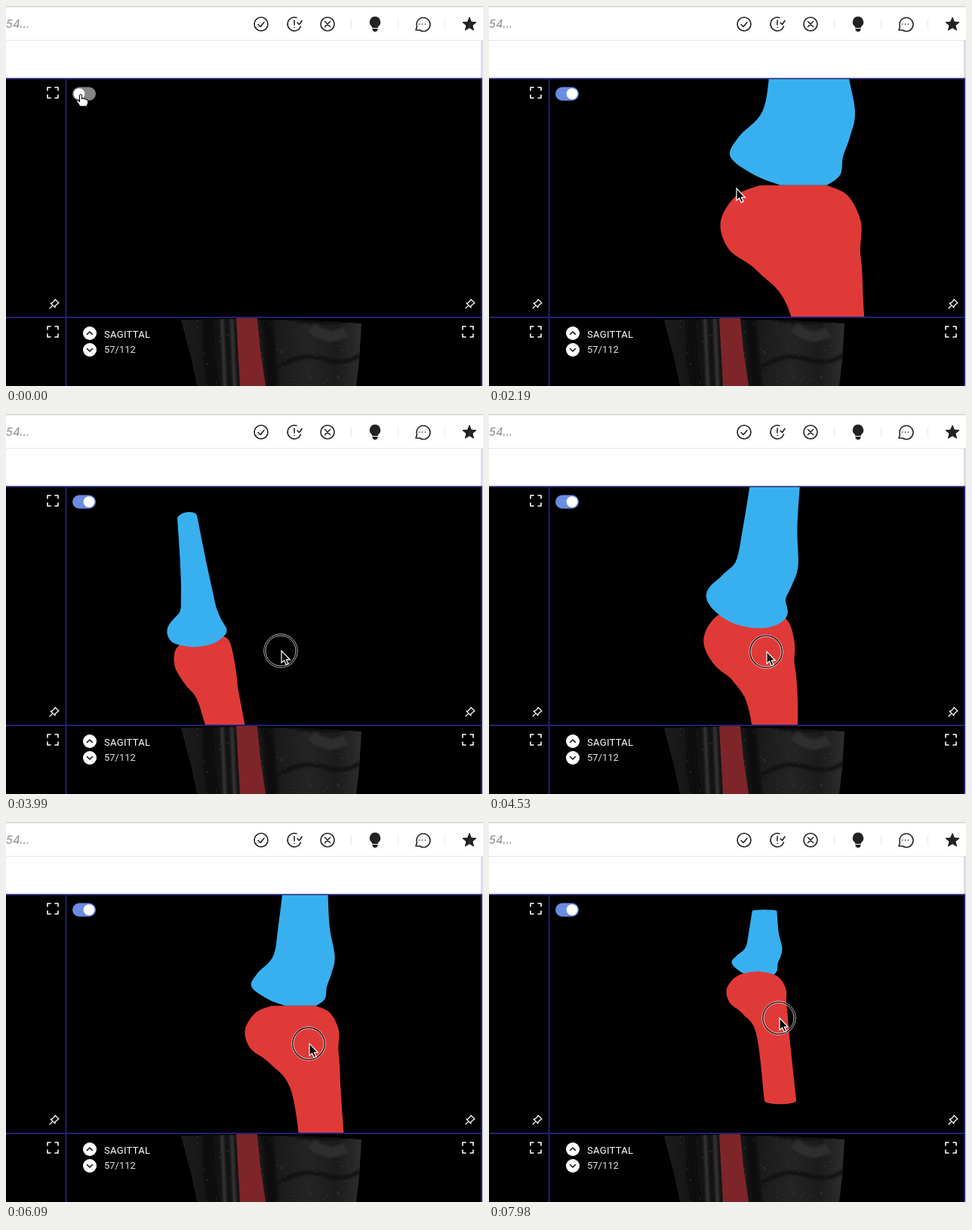
Write an HTML page that moves like this. It is 632x504 px and loops after 8 s.

```html
<!DOCTYPE html>
<html lang="en">
<head>
<meta charset="utf-8">
<title>Segmentation viewer</title>
<style>
  html, body { margin: 0; width: 100%; height: 100%; overflow: hidden; background: #fff; }
  svg { display: block; width: 632px; height: 504px; }
  .line { fill: none; stroke-linecap: round; stroke-linejoin: round; }
  .bar { stroke: #222; stroke-width: 1.6; }
  .tool { stroke: #fff; stroke-width: 1.6; }
  .thin { stroke-width: 1.2; }
  .grid { stroke: #22226f; stroke-width: 2; fill: none; }
  .label { font: 13px Roboto, sans-serif; letter-spacing: .3px; fill: #fff; }
  .count { letter-spacing: 0; fill: #e2e2e2; }
  #track { animation: track 8s linear infinite; }
  #thumb { animation: thumb 8s linear infinite; }
  @keyframes track { 0%, 4.1% { fill: #868686; } 6.4%, 100% { fill: #6c8ce2; } }
  @keyframes thumb { 0%, 4.1% { transform: none; } 6.4%, 100% { transform: translateX(13px); } }
</style>
</head>
<body>
<svg viewBox="0 0 632 504">
  <defs>
    <clipPath id="view"><rect x="80" y="97" width="549" height="315"/></clipPath>
    <clipPath id="scan"><path d="M232 416L300 415 400 417 471 421 468 470 464 504H253L246 470Z"/></clipPath>
    <linearGradient id="tissue">
      <stop offset="0" stop-color="#1d1d1d"/><stop offset=".2" stop-color="#121212"/>
      <stop offset=".5" stop-color="#191919"/><stop offset=".7" stop-color="#242424"/>
      <stop offset=".85" stop-color="#1b1b1b"/><stop offset="1" stop-color="#303030"/>
    </linearGradient>
    <filter id="soft"><feGaussianBlur stdDeviation="1.5"/></filter>
    <path id="expand" class="line tool" d="M-7 -3V-7H-3M3 -7H7V-3M7 3V7H3M-3 7H-7V3"/>
    <path id="pin" class="line tool thin" d="M1 -6L6 -1 4 0 1 3 1 5-5 -1-3 -1 0 -4ZM-2 2L-6 6"/>
  </defs>

  <rect width="632" height="504" fill="#fff"/>
  <path d="M0 .5H632" stroke="#d4d4d4" stroke-width="2"/>
  <path d="M0 45.5H632" stroke="#e4e4e4"/>
  <path d="M630.5 46V504" stroke="#dcdcea" stroke-width="3"/>
  <text x="0" y="29" font-family="Inter, sans-serif" font-size="15" font-style="italic" fill="#8a8a8a">54...</text>

  <g class="line bar">
    <circle cx="338" cy="24" r="9"/><path d="M334 24.5l3 3 5-6"/>
    <path d="M385 15.5A9 9 0 1 0 390.5 27M382 19v6M382 28.5v.1M386 22l2.500 2.500 3.500-5"/>
    <circle cx="426" cy="24" r="9"/><path d="M422.5 20.5l7 7m0-7l-7 7"/>
    <path d="M543 32l1.500-4.500A9 9 0 1 1 548 32Z"/>
    <path d="M547.5 24v.1M551.5 24v.1M555.5 24v.1"/>
  </g>
  <path d="M457.5 17V31M519.5 17V31M581.5 17V31" stroke="#e8e8e8"/>
  <path d="M489 14a7.300 7.300 0 0 1 4 13.300V29H485v-1.700A7.300 7.300 0 0 1 489 14ZM485.5 30h7v2l-2 2h-3l-2-2Z" fill="#222"/>
  <path id="star" fill="#222" stroke="#222" stroke-linejoin="round"/>

  <rect y="96" width="630" height="408" fill="#000"/>

  <g clip-path="url(#scan)">
    <rect x="230" y="414" width="245" height="90" fill="url(#tissue)"/>
    <g filter="url(#soft)" fill="none">
      <path d="M268 412Q266 470 276 506" stroke="#070707" stroke-width="12"/>
      <path d="M286 412L290 506M299 412L303 506" stroke="#383838" stroke-width="4"/>
      <path d="M293 412L296 506" stroke="#111" stroke-width="3"/>
      <path d="M346 412L354 506" stroke="#0c0c0c" stroke-width="14"/>
      <path d="M374 414Q420 424 470 412" stroke="#0d0d0d" stroke-width="6"/>
      <path d="M360 480Q390 458 420 468T470 462" stroke="#111" stroke-width="4"/>
      <path d="M405 426Q425 446 450 432" stroke="#2d2d2d" stroke-width="14"/>
    </g>
    <path id="grain" stroke="#363636" fill="none"/>
  </g>
  <path d="M305 414H333L337 456 344 504H310Z" fill="#7e2529"/>

  <path class="grid" d="M0 96.500H630V504M79.500 96V504M0 413H630"/>
  <use href="#expand" x="62" y="115"/><use href="#expand" x="62" y="432"/><use href="#expand" x="612" y="432"/>
  <use href="#pin" x="64" y="395"/><use href="#pin" x="615" y="395"/>
  <circle cx="111" cy="434" r="9" fill="#fff"/><circle cx="111" cy="456" r="9" fill="#fff"/>
  <path class="line" d="M107.500 435.500l3.500-3.500 3.500 3.500M107.500 454.500l3.500 3.500 3.500-3.500" stroke="#111" stroke-width="1.600"/>
  <text class="label" x="130" y="440">SAGITTAL</text>
  <text class="label count" x="130" y="460">57/112</text>

  <g id="model" clip-path="url(#view)">
    <path id="shin" fill="#e03a38"/>
    <path id="thigh" fill="#38b0f0"/>
  </g>

  <rect id="track" x="88" y="107.500" width="31" height="18" rx="9"/>
  <circle id="thumb" cx="97" cy="116.500" r="7.300" fill="#fff"/>
  <g id="pointer">
    <g id="ring" fill="none">
      <circle r="22.200" stroke="#eee" stroke-width=".9"/>
      <circle r="21.200" stroke="#111" stroke-width="1.300"/>
      <circle r="20" stroke="#ddd" stroke-width=".8"/>
    </g>
    <path id="arrow" d="M1 0V16L4.600 12.700 7.200 18.600 10 17.400 7.400 11.800H12.300Z" fill="#000" stroke="#fff" stroke-width="1.200"/>
    <path id="hand" d="M-1.500 1.500Q0 -1 1.500 1.500V6Q3 4.500 4.300 6.300 6 5.300 7 7.200 9.500 6.500 9.500 9V12Q9 14 8 16H-1Q-3 12.500-5.500 9.500-5 7-1.500 9.800Z" fill="#fff" stroke="#111" stroke-width="1.100"/>
  </g>
</svg>

<script>
const LOOP = 8000, SLICES = 48, DISTANCE = 200;
const $ = id => document.getElementById(id);
const lerp = (a, b, u) => a + (b - a) * u;

// Each bone is a stack of elliptic slices: height, back, front, left, right.
const bones = {
  thigh: [
    [-72, -9, 17, -1, 10], [-47, -12, 18, -4, 11], [-29, -15, 21, -7, 12], [-19, -24, 19, -10, 13],
    [-11, -27, 16, -19, 15], [-4, -18, 15, -18, 17], [0, -8, 10, -9, 11]
  ],
  shin: [
    [0, -16, 10, -11, 15], [4, -25, 18, -17, 18], [14, -31, 23, -19, 19], [25, -28, 23, -15, 19],
    [34, -17, 24, -9, 18], [52, -4, 25, -6, 18], [105, 3, 29, 0, 18]
  ]
};

// A view keeps what it does not change; x, y is the knee, mx, my the mouse.
const views = [];
const view = (t, change = {}) => views.push({ ...views.at(-1), ...change, t });
const zoomTo = zoom => ({ zoom, x: 355 + 17 * zoom, y: 255 - 5 * zoom });

view(0, { yaw: 0, pitch: 0, roll: 0, mx: 99, my: 117, ...zoomTo(.91) });
view(960);
view(1470, { mx: 327, my: 242 });
view(1650);
view(1680, zoomTo(1));
view(1980, zoomTo(5.95));
view(2130);
view(2220, zoomTo(2.25));
view(2490);
view(2970, { yaw: 90, x: 265, y: 246, mx: 357, my: 299 });
view(3130, { x: 134, mx: 415 });
view(3330, { pitch: 6, roll: -4, x: 208, y: 265, mx: 386, my: 303 });
view(3990, { pitch: 14, roll: -10, zoom: 2.15, x: 258, y: 303, mx: 364, my: 314 });
view(4500, { yaw: 45, pitch: 23, roll: 2, zoom: 2.7, x: 350, y: 270 });
view(4950, { yaw: 17, pitch: 46, roll: 12, zoom: 2.2, x: 400, y: 318, mx: 408, my: 331 });
view(5130, { pitch: 53, x: 405, y: 350, mx: 410 });
view(5500);
view(6090, { yaw: 0, pitch: 0, roll: 0, zoom: 2.3, x: 388, y: 244, mx: 401, my: 294 });
view(6540, { pitch: -74, zoom: 2, x: 360, y: 168, mx: 397, my: 267 });
view(7110);
view(7200, { zoom: 1.3, y: 190 });
view(7500);
view(7620, { mx: 359, my: 211 });
view(7830);
view(7980, { pitch: -18, zoom: 1.43, y: 203, mx: 384, my: 260 });
view(LOOP);

function viewAt(t) {
  const i = views.findIndex(v => v.t > t);
  const a = views[i - 1], b = views[i], u = (t - a.t) / (b.t - a.t);
  return Object.fromEntries(Object.keys(a).map(k => [k, lerp(a[k], b[k], u)]));
}

// Catmull-Rom through the rows, u from 0 to 1.
function sliceAt(rows, u) {
  const last = rows.length - 1, i = Math.min(last - 1, Math.floor(u * last)), f = u * last - i;
  const row = k => rows[Math.max(0, Math.min(last, k))];
  const [p, q, r, s] = [row(i - 1), row(i), row(i + 1), row(i + 2)];
  return q.map((v, j) => v + f / 2 * (r[j] - p[j] +
    f * (2 * p[j] - 5 * v + 4 * r[j] - s[j] + f * (3 * (v - r[j]) + s[j] - p[j]))));
}

function project([h, back, front, left, right], v) {
  const yaw = v.yaw * Math.PI / 180, pitch = v.pitch * Math.PI / 180;
  const c = Math.cos(yaw), s = Math.sin(yaw), cp = Math.cos(pitch), sp = Math.sin(pitch);
  const cx = (back + front) / 2, cz = (left + right) / 2;
  const rx = (front - back) / 2, rz = (right - left) / 2;
  const z = cz * c - cx * s;
  const k = v.zoom / (1 + (h * sp + z * cp) / DISTANCE);
  return {
    x: v.x + k * (cx * c + cz * s),
    y: v.y + k * (h * cp - z * sp),
    rx: k * Math.hypot(rx * c, rz * s),
    ry: k * Math.hypot(rx * s, rz * c) * Math.abs(sp)
  };
}

function silhouette(rows, v) {
  let d = '', up;
  for (let i = 0; i <= SLICES; i++) {
    const e = project(sliceAt(rows, i / SLICES), v);
    const l = e.x - e.rx, r = e.x + e.rx;
    if (e.ry > .1) d += `M${l} ${e.y}A${e.rx} ${e.ry} 0 0 1 ${r} ${e.y}A${e.rx} ${e.ry} 0 0 1 ${l} ${e.y}Z`;
    if (up) d += `M${up.x - up.rx} ${up.y}H${up.x + up.rx}L${r} ${e.y}H${l}Z`;
    up = e;
  }
  return d;
}

const show = (id, on) => { $(id).style.display = on ? '' : 'none'; };

function draw(t) {
  const v = viewAt(t);
  show('model', t >= 720);
  $('model').append($(v.pitch > 0 ? 'thigh' : 'shin'));
  for (const id in bones) {
    $(id).setAttribute('d', silhouette(bones[id], v));
    $(id).setAttribute('transform', `rotate(${v.roll} ${v.x} ${v.y})`);
  }
  $('pointer').setAttribute('transform', `translate(${v.mx} ${v.my})`);
  const hovering = v.mx < 125;
  show('hand', hovering);
  show('arrow', !hovering);
  show('ring', t >= 2490 && t < 6570 || t >= 7830);
}

function setup() {
  const tips = Array.from({ length: 10 }, (_, i) => {
    const r = i % 2 ? 4.2 : 9.5, a = Math.PI * (i / 5 - .5);
    return [614 + r * Math.cos(a), 24.5 + r * Math.sin(a)];
  });
  $('star').setAttribute('d', 'M' + tips.join('L') + 'Z');

  let seed = 7, grain = '';
  const rand = n => (seed = seed * 16807 % 2147483647) / 2147483647 * n;
  for (let i = 0; i < 90; i++) grain += `M${235 + rand(230)} ${418 + rand(84)}l${rand(4)} ${rand(4) - 2}`;
  $('grain').setAttribute('d', grain);
}

setup();
const start = performance.now();
function tick() {
  draw((performance.now() - start) % LOOP);
  requestAnimationFrame(tick);
}
tick();
</script>
</body>
</html>
```
